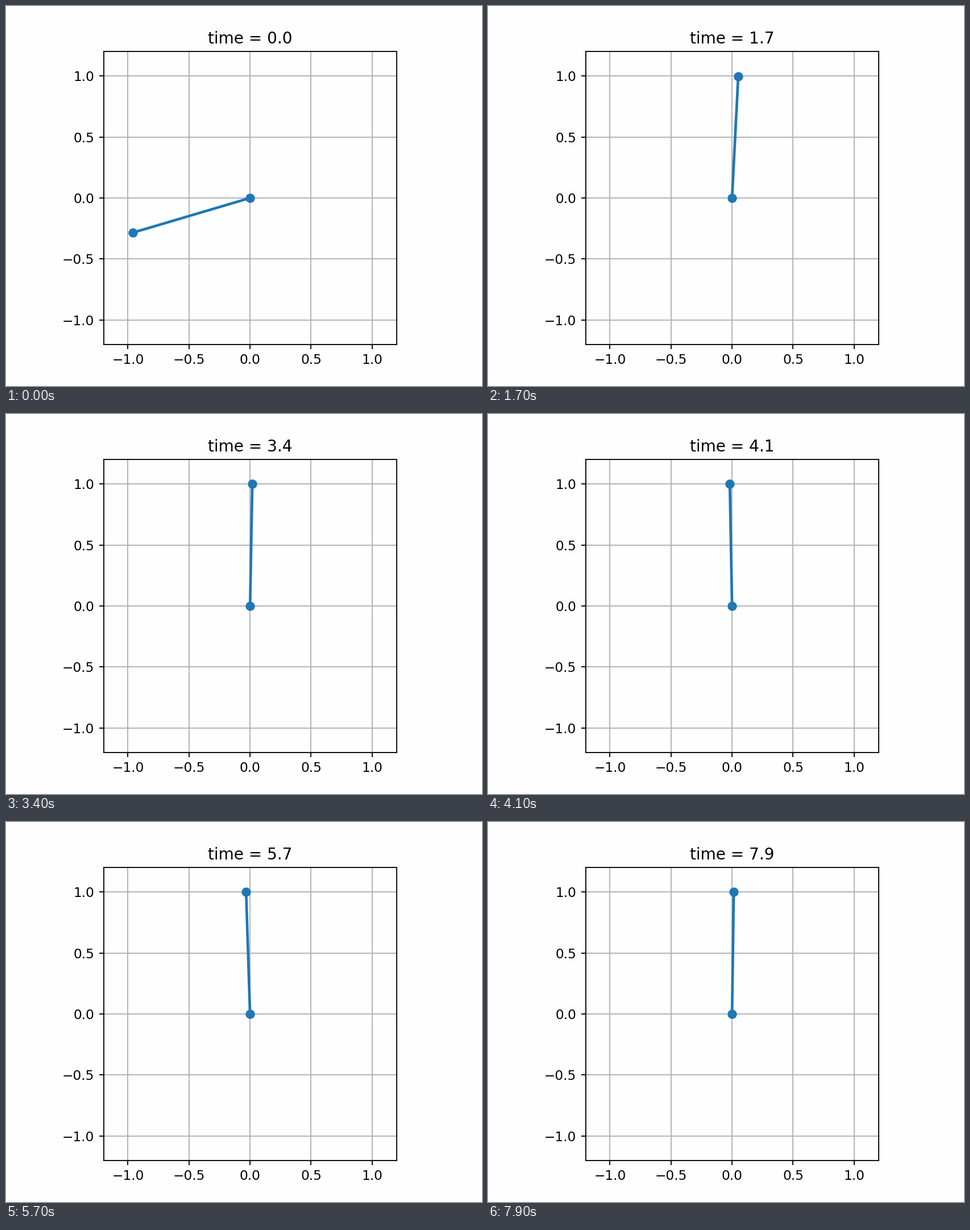
A matplotlib script that plays this animation: 837x669 px, repeating every 8000 ms.

```python
import numpy as np
import matplotlib.pyplot as plt
from matplotlib.animation import FuncAnimation

W, H, DPI = 837, 669, 167.3
STEP_MS, FRAMES = 100, 80
PAPER = "#fefefe"

GRAVITY = 9.8       # per unit length
TORQUE = 1.65
START = -73.5       # degrees from hanging down, positive to the right
LAUNCH = 3.6        # rad/s
COAST, HOLD = 0.9, 1.8

# Turning points of the balancing sway: seconds, degrees from upright
SWAY = [(HOLD, 2.1), (2.2, -1.95), (2.85, 1.8), (4.8, -2.2),
        (5.7, -1.85), (6.8, -2.5), (8.2, 1.2)]


def swing(t, dt=0.001):
    """Pendulum pushed by a constant torque; returns the lean from upright."""
    phi, v = np.radians(START), LAUNCH
    for _ in range(round(t / dt)):
        v += (TORQUE - GRAVITY * np.sin(phi)) * dt
        phi += v * dt
    return np.pi - phi


def coast(t):
    """Rise with just enough energy to come to rest upright."""
    fade = np.exp(-np.sqrt(GRAVITY) * (t - COAST))
    return 4 * np.arctan(np.tan(swing(COAST) / 4) * fade)


def sway(t):
    for (t0, a), (t1, b) in zip(SWAY, SWAY[1:]):
        if t <= t1:
            ease = (1 - np.cos(np.pi * (t - t0) / (t1 - t0))) / 2
            return np.radians(a + (b - a) * ease)


def lean(t):
    if t <= COAST:
        return swing(t)
    return coast(t) if t < HOLD else sway(t)


plt.rcParams["font.family"] = "DejaVu Sans"
fig = plt.figure(figsize=((W + 0.01) / DPI, (H + 0.01) / DPI),
                 dpi=DPI, facecolor=PAPER)
ax = fig.add_axes([0.1252, 0.1098, 0.775, 0.77], facecolor=PAPER)
ax.set(xlim=(-1.2, 1.2), ylim=(-1.2, 1.2), aspect="equal",
       xticks=np.arange(-1, 1.1, 0.5), yticks=np.arange(-1, 1.1, 0.5))
ax.grid()

rod, = ax.plot([], [], "o-", color="C0", lw=2)
title = ax.set_title("time = 0.0")


def update(i):
    t = i * STEP_MS / 1000
    a = lean(t)
    rod.set_data([0, np.sin(a)], [0, np.cos(a)])
    title.set_text(f"time = {t:.1f}")
    return rod, title


anim = FuncAnimation(fig, update, frames=FRAMES, interval=STEP_MS,
                     repeat=True, repeat_delay=0, blit=False)
plt.show()
```
